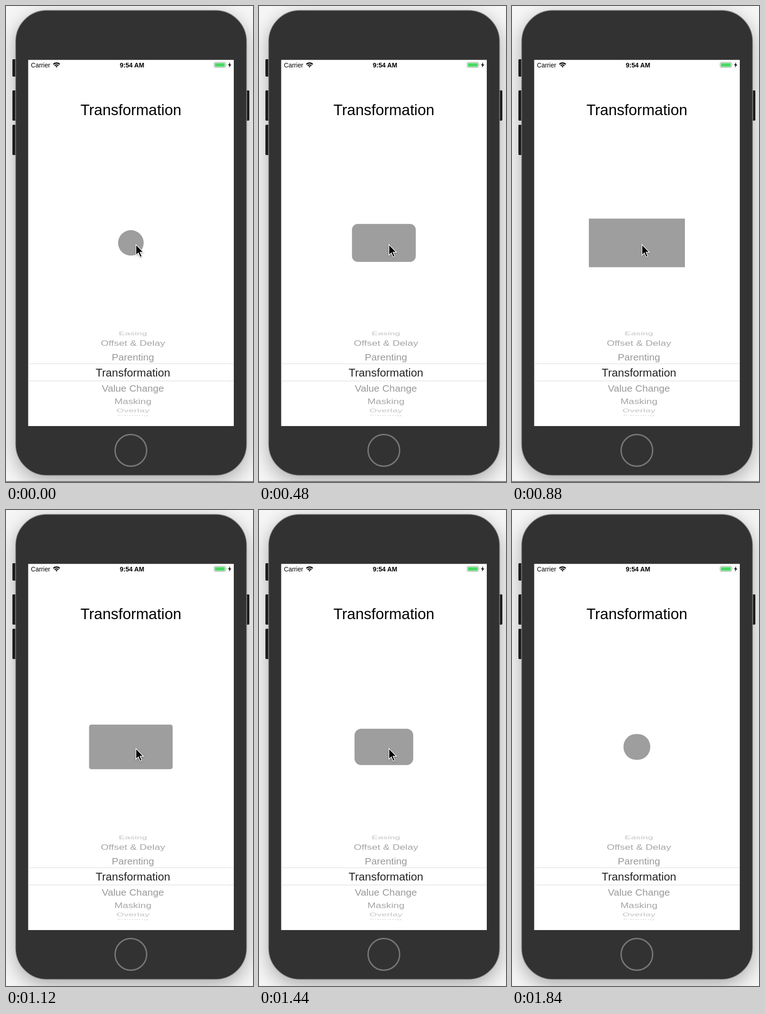
Write an HTML page that moves like this. It is 540 px wide and 1038 px high and loops after 1.92 s.

```html
<!DOCTYPE html>
<html lang="en">
<head>
<meta charset="utf-8">
<title>Transformation</title>
<style>
  html, body { margin: 0; width: 100%; height: 100%; overflow: hidden; background: #f6f6f6; }
  svg { display: block; width: 100vw; height: 100vh; }
  text { font-family: "Liberation Sans", Arial, sans-serif; }
  .middle { text-anchor: middle; }
  #phone { filter: drop-shadow(0 12px 20px rgba(0, 0, 0, .3)); }
</style>
</head>
<body>
<svg viewBox="0 0 540 1038" preserveAspectRatio="none">
  <g fill="#222">
    <rect x="14" y="116" width="12" height="38" rx="2"/>
    <rect x="14" y="184" width="12" height="66" rx="2"/>
    <rect x="14" y="259" width="12" height="66" rx="2"/>
    <rect x="520" y="184" width="12" height="66" rx="2"/>
  </g>
  <rect id="phone" x="21" y="9.5" width="505" height="1014" rx="68" fill="#323232" stroke="#8a8a8a" stroke-width="1.5"/>
  <circle cx="273" cy="969" r="34.5" fill="none" stroke="#777" stroke-width="3"/>
  <rect x="48.5" y="117.5" width="449.5" height="798.5" fill="#fff"/>

  <!-- status bar -->
  <text x="54.5" y="133.5" font-size="13.8">Carrier</text>
  <text class="middle" x="275.5" y="133.5" font-size="14.1" font-weight="bold">9:54 AM</text>
  <g fill="none" stroke="#000" stroke-width="2.3">
    <path d="M103.6 127.2a9.6 9.6 0 0 1 13.8 0"/>
    <path d="M106.3 130.1a6 6 0 0 1 8.4 0"/>
  </g>
  <path d="M110.5 134.3l-2.3-2.5a3.3 3.3 0 0 1 4.6 0z"/>
  <rect x="455" y="122.7" width="25" height="11.4" rx="2.5" fill="#fff" stroke="#999"/>
  <rect x="456.7" y="124.4" width="21.6" height="8" rx="1" fill="#4cd964"/>
  <path d="M481.4 126.6q1.6 1.8 0 3.6z" fill="#999"/>
  <path d="M490.3 122.6l-4.8 6.6h3l-1.3 5.2 5.3-7h-3.2z"/>

  <text class="middle" x="273" y="237.5" font-size="33">Transformation</text>
  <path d="M48.5 780h449.5M48.5 817.7h449.5" stroke="#d8d8d8"/>
  <g id="wheel" class="middle"></g>

  <rect id="shape" fill="#9e9e9e"/>
  <path id="cursor" d="M284 520v23.5l5.3-5 4.1 9.3 3.8-1.7-4-9h7.2z"
    stroke="#fff" stroke-width="1.5" style="filter: drop-shadow(0 1.5px 1.5px rgba(0, 0, 0, .4))"/>
  <path id="edge" d="M0 1037h540" stroke="#5a5a5a" stroke-width="1.4"/>
</svg>
<script>
const LOOP = 1920, STEP = 80;
const byId = id => document.getElementById(id);

// label, baseline, font size, vertical foreshortening, colour
const rows = [
  ['Easing', 718, 20.3, .5, '#c4c4c4'],
  ['Offset & Delay', 741.3, 21.9, .76, '#a6a6a6'],
  ['Parenting', 772.5, 21.6, .97, '#999'],
  ['Transformation', 808, 24.4, 1, '#222'],
  ['Value Change', 840.5, 21.7, .97, '#999'],
  ['Masking', 867.5, 21.8, .76, '#a6a6a6'],
  ['Overlay', 886.4, 21, .5, '#c4c4c4'],
  ['Cloning', 894, 20.4, .2, '#d8d8d8']
];
for (const [label, y, size, tilt, colour] of rows) {
  const row = document.createElementNS('http://www.w3.org/2000/svg', 'text');
  row.textContent = label;
  row.setAttribute('transform', `translate(277.5 ${y}) scale(1 ${tilt})`);
  row.setAttribute('font-size', size);
  row.setAttribute('fill', colour);
  byId('wheel').append(row);
}

// time in ms, width of the shape
const widths = [[0, 56], [320, 112.5], [640, 166.5], [880, 210], [960, 210],
                [1280, 155.5], [1600, 101.5], [1840, 58.5], [LOOP, 56]];

function widthAt(t) {
  const i = widths.findIndex(([end]) => end > t);
  const [t0, w0] = widths[i - 1], [t1, w1] = widths[i];
  return w0 + (w1 - w0) * (t - t0) / (t1 - t0);
}

function pose(t) {
  const w = widthAt(t), k = (w - 56) / 154;
  const h = 55.5 + 50.5 * k;
  return {
    x: `${273 - w / 2}px`, y: `${516.6 - h / 2}px`,
    width: `${w}px`, height: `${h}px`,
    rx: `${28 * (1 - k)}px`, ry: `${28 * (1 - k)}px`
  };
}

function play(id, poseAt) {
  const frames = [];
  for (let t = 0; t < LOOP; t += STEP)
    frames.push({ ...poseAt(t), offset: t / LOOP, easing: 'step-end' });
  frames.push({ ...poseAt(LOOP - STEP), offset: 1 });
  byId(id).animate(frames, { duration: LOOP, iterations: Infinity });
}

play('shape', pose);
play('cursor', t => ({ opacity: t < 1840 ? 1 : 0 }));
play('edge', t => ({ opacity: t < 1040 ? 1 : 0 }));
</script>
</body>
</html>
```
